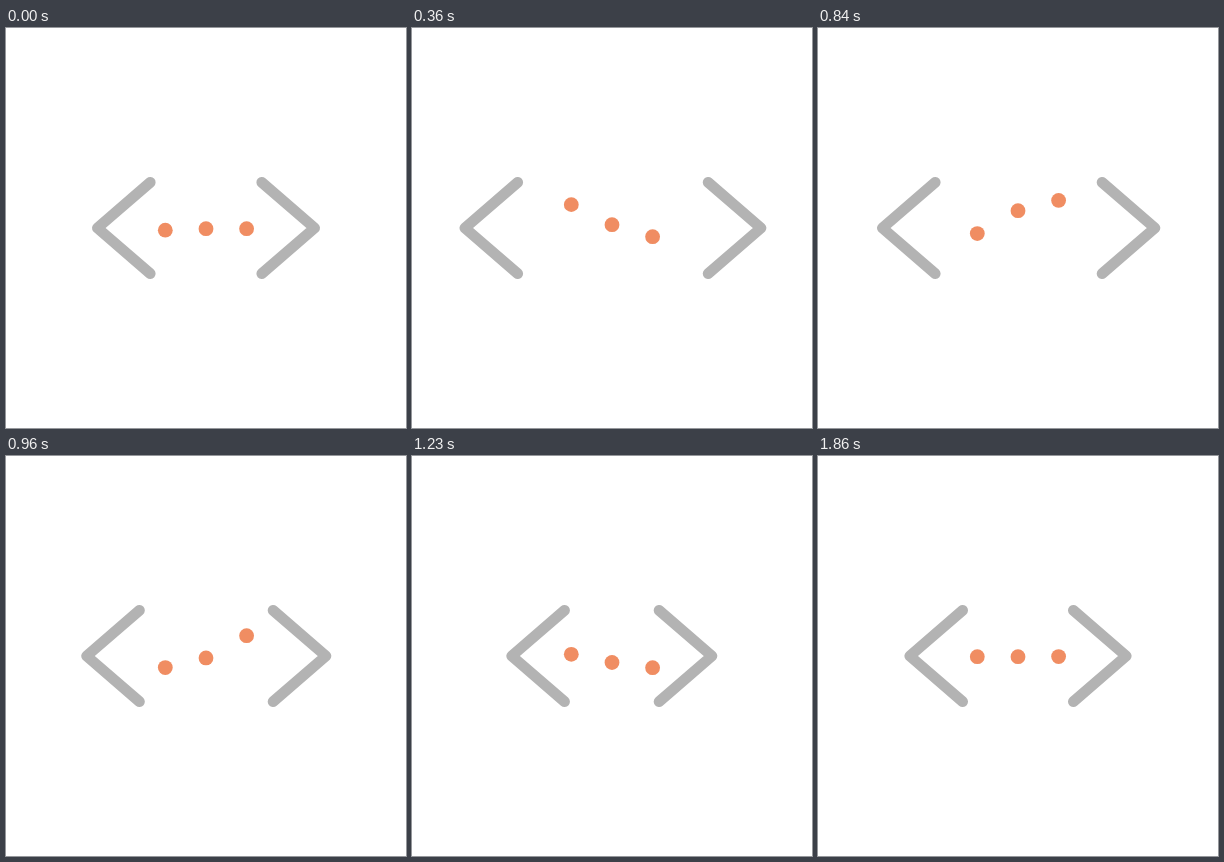
Recreate the animation shown at these times as an HTML page. Size 400 by 400 pixels, loop 3.89 s.

```html
<!DOCTYPE html>
<html lang="en">
<head>
<meta charset="utf-8">
<title>Bouncing code brackets</title>
<style>
  html, body { margin: 0; width: 100%; height: 100%; overflow: hidden; background: #fff; }
  svg { display: block; width: 100%; height: 100%; }
  path { fill: none; stroke: #b3b3b3; stroke-width: 10.8; stroke-linecap: round; stroke-linejoin: round; }
  circle { fill: #f08d62; }
</style>
</head>
<body>
<svg viewBox="0 0 400 400">
  <path id="left" d="M144.6 154.3 L91.8 200 L144.6 245.7"/>
  <path id="right" d="M255.4 154.3 L308.2 200 L255.4 245.7"/>
  <circle class="dot" cx="159.3" cy="200.7" r="7.4"/>
  <circle class="dot" cx="200" cy="200.7" r="7.4"/>
  <circle class="dot" cx="240.6" cy="200.7" r="7.4"/>
</svg>
<script>
const LOOP = 3890, STEP = 30, LAST_STEP = 1860, DOT_DELAY = 145;

// Keys: [time in ms, value, x1, x2]; the curve into a key is cubic-bezier(x1, 0, x2, 1).
const spread = [
  [-30, 0], [550, 1, .33, .2], [1210, -.19, .55, .61], [1560, 0, .36, .64]
];
const hop = [
  [-30, 0], [75, 8, .36, .64], [520, -28.5, .41, .29],
  [935, 11, .53, .65], [1310, -4, .36, .64], [1600, 0, .36, .64]
];

function ease(x, x1, x2) {
  let low = 0, high = 1, s;
  for (let i = 0; i < 24; i++) {
    s = (low + high) / 2;
    const at = 3 * (1 - s) ** 2 * s * x1 + 3 * (1 - s) * s * s * x2 + s ** 3;
    if (at < x) low = s; else high = s;
  }
  return s * s * (3 - 2 * s);
}

function valueAt(keys, time) {
  if (time <= keys[0][0]) return keys[0][1];
  const next = keys.findIndex(key => key[0] > time);
  if (next < 0) return keys[keys.length - 1][1];
  const [start, from] = keys[next - 1];
  const [end, to, x1, x2] = keys[next];
  return from + (to - from) * ease((time - start) / (end - start), x1, x2);
}

const left = document.getElementById("left");
const right = document.getElementById("right");
const dots = document.querySelectorAll(".dot");
const begin = performance.now();

function draw() {
  const elapsed = (performance.now() - begin) % LOOP;
  const time = Math.min(Math.floor(elapsed / STEP) * STEP, LAST_STEP);
  const opening = valueAt(spread, time);
  left.setAttribute("transform", `translate(${-42 * opening} 0)`);
  right.setAttribute("transform", `translate(${44 * opening} 0)`);
  dots.forEach((dot, i) => {
    dot.setAttribute("transform", `translate(0 ${valueAt(hop, time - i * DOT_DELAY)})`);
  });
  requestAnimationFrame(draw);
}
draw();
</script>
</body>
</html>
```
